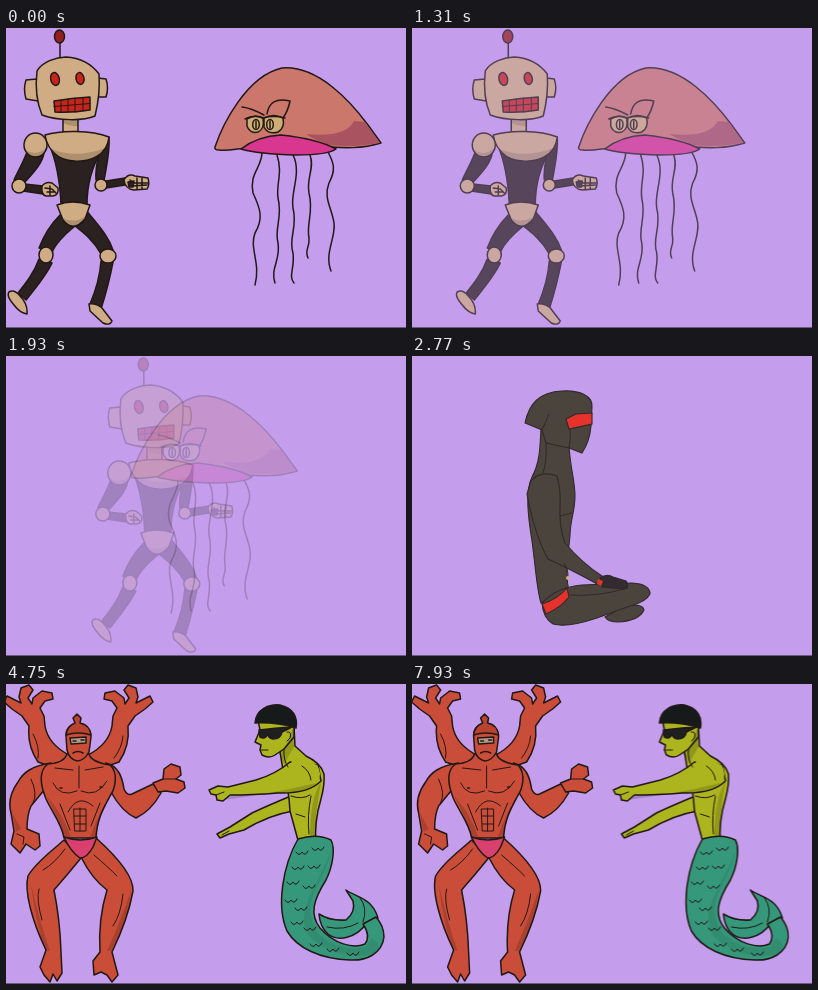
An HTML page that plays this animation: 400x300 px, repeating every 7990 ms.

```html
<!DOCTYPE html>
<html lang="en">
<head>
<meta charset="utf-8">
<title>Fusions</title>
<style>
html, body { margin: 0; width: 100%; height: 100%; overflow: hidden; background: #c49dec; }
svg { display: block; width: 100%; height: 100%; }
.ink { stroke: #221815; stroke-width: 1.5; stroke-linejoin: round; stroke-linecap: round; }
.line { fill: none; }
.thin { stroke-width: 1; }
.shade { stroke: none; fill: #000; opacity: .16; }
.bone { fill: #cfac84; }
.dark { fill: #2a2120; }
.lamp { fill: #c8241c; }
.ninja { fill: #4b443c; stroke: #30282a; stroke-width: 1.1; }
.flesh { fill: #ca4d38; }
.lime { fill: #acb41e; }
.teal { fill: #36987a; }
</style>
</head>
<body>
<svg viewBox="0 0 400 300" preserveAspectRatio="none">
<rect width="400" height="300" fill="#c49dec"/>

<g id="robot" class="ink">
  <path class="line" d="M54 14V30"/>
  <ellipse class="lamp" cx="53.500" cy="8.500" rx="5" ry="6.500" style="fill:#94201d"/>
  <g class="bone">
    <path d="M57 89V104H72V89Z"/>
    <path d="M31 51L20 52Q17 61 20 71L32 73ZM92 50L100 51Q103 60 100 69L91 69Z"/>
    <path d="M31 43C36 34 50 29 60 29C76 30 87 38 93 46C94 60 92 76 89 88C78 93 52 93 36 87C31 75 29 60 31 43Z"/>
  </g>
  <g class="lamp">
    <ellipse cx="49" cy="51" rx="4.300" ry="6.500" transform="rotate(-14 49 51)"/>
    <ellipse cx="74" cy="50.500" rx="4" ry="6" transform="rotate(-12 74 50.500)"/>
    <path d="M48 73Q66 70 84 69V82Q66 85 49 84Z"/>
  </g>
  <path class="line thin" d="M48 78.500L84 75.500M55 72V84M62 71V84M69 70V84M77 70V83"/>
  <g class="dark">
    <path d="M43 116C50 132 54 155 55 176L81 177C81 155 86 138 96 122Z"/>
    <path d="M94 120L103 109C104 125 100 140 98 153L90 152C89 140 92 130 94 120Z"/>
    <path d="M100 153L119 150V157L100 160Z"/>
    <path d="M21 124L38 125C36 136 27 145 19 154L8 152C12 143 17 135 21 124Z"/>
    <path d="M18 156L37 158V166L17 163Z"/>
    <path d="M54 187L69 198C58 207 50 215 46 224L33 220C38 207 46 195 54 187Z"/>
    <path d="M33 231L46 235C40 248 28 262 20 272L12 265C20 255 28 245 33 231Z"/>
    <path d="M80 182C90 195 102 207 107 222L95 226C88 213 78 205 69 198Z"/>
    <path d="M95 233L107 234C104 250 100 265 95 281L84 276C90 262 94 248 95 233Z"/>
  </g>
  <g class="bone">
    <path d="M39 107C55 102 85 102 103 109C102 119 97 125 90 129C79 135 62 134 53 129C46 124 40 116 39 107Z"/>
    <ellipse cx="29.500" cy="117" rx="11.500" ry="12"/>
    <circle cx="13" cy="158" r="7"/>
    <circle cx="95" cy="157" r="6"/>
    <path d="M36 158Q40 153 46 155L52 160Q53 167 47 168H40Q35 167 36 158Z"/>
    <path d="M118 152Q122 145 129 148L142 150Q144 157 141 161L128 162Q119 161 118 152Z"/>
    <path d="M51 177Q66 171 84 177L79 191Q67 205 57 192Z"/>
    <ellipse cx="40" cy="227" rx="7" ry="8"/>
    <ellipse cx="102" cy="228" rx="8" ry="7"/>
    <path d="M3 264Q8 261 14 268Q22 276 21 286Q14 285 8 277Q0 268 3 264Z"/>
    <path d="M83 276Q90 275 96 280L106 293Q104 298 97 295L84 283Z"/>
  </g>
  <path class="line" d="M39 160L46 161L50 165M41 164L48 164M44 158V167M124 152L128 155H142M126 158L141 157M131 150V161M136 150V161"/>
  <path class="dark" d="M122 154L128 153L127 159L123 159Z"/>
  <path class="shade" d="M57 92H72V98Q64 99 57 95ZM45 121Q70 131 99 120Q96 126 90 129Q62 137 53 129ZM57 190Q68 196 80 188L77 195Q67 204 57 192ZM20 122Q30 129 41 119Q39 129 30 129Q22 129 20 122Z"/>
</g>

<g id="jelly" class="ink">
  <path class="line" d="M256 124C256 140 243 145 247 165C254 180 258 190 249 205C243 220 255 235 249 257
    M271 127C277 145 270 155 272 170C277 190 268 200 272 215C275 232 264 240 269 255
    M287 127C296 145 284 165 287 180C292 200 282 210 287 225C289 240 282 248 288 255
    M304 127C309 140 300 150 303 165C308 185 300 195 303 210C304 220 298 222 302 230
    M322 124C328 135 330 142 323 155C317 170 326 180 328 195C330 210 318 225 325 243"/>
  <path fill="#cb776c" d="M209 119C216 98 240 48 276 40C312 37 345 74 362 97L375 115C355 121 338 120 324 119L240 120C230 121 222 123 213 122Q208 122 209 119Z"/>
  <path fill="#a8535f" stroke="none" d="M359 94L374 115Q345 120 324 117Q308 112 300 106Q340 110 348 93Z"/>
  <path fill="#d8368f" d="M235 121Q252 108 275 107Q312 111 330 121Q322 127 290 127Q252 126 235 121Z"/>
  <g fill="#cfae76">
    <path d="M241 91Q249 86 257 90Q259 101 252 104Q244 106 241 98Z"/>
    <path d="M258 90Q268 85 277 90Q279 100 272 104Q262 107 258 99Z"/>
  </g>
  <path class="line" d="M236 79Q245 80 258 87M261 86C263 74 270 70 284 73Q282 83 277 90M239 91Q248 86 257 90Q268 87 279 90"/>
  <g fill="#cfae76"><ellipse cx="250" cy="96.500" rx="3.300" ry="5"/><ellipse cx="264" cy="96.500" rx="3.300" ry="5"/></g>
  <path class="line" d="M250 93V100M264 93V100"/>
</g>

<g id="meditator" class="ninja">
  <path d="M193 261L213 250Q231 247 232 254Q227 265 206 266Q196 266 193 261Z"/>
  <path d="M129 72C128 92 128 106 120 121C113 135 116 160 120 185C124 215 125 235 129 247L158 238C152 220 156 200 158 180C158 165 163 155 163 140C163 125 158 110 157 90Z"/>
  <path d="M113 67C117 48 127 36 150 35C168 34 181 40 180 51L179 70C178 82 174 91 170 97L157 92L134 87L130 74Z"/>
  <path d="M130 247Q145 231 170 229L220 227Q238 228 238 238Q234 246 218 250L185 262Q155 272 141 268Q131 262 130 247Z"/>
  <path d="M119 125Q128 114 145 120Q149 135 148 150Q147 172 153 187Q170 207 190 220L187 229Q160 214 136 203C126 185 119 160 115 138Z"/>
  <path d="M188 222Q195 217 201 221L214 225Q219 231 211 233L190 231Z" style="fill:#342b30"/>
  <path class="line thin" d="M130 74Q134 65 137 58M158 73Q159 84 157 92M134 87Q135 105 131 117M148 160L160 157M152 207Q158 216 155 225M158 239Q185 241 216 232"/>
  <g style="fill:#e5332b">
    <path d="M154 63L164 58L180 57V68L157 73Z"/>
    <path d="M130 248Q146 243 155 232L157 241Q148 252 134 258Z"/>
    <path d="M186 223L191 225L189 230L185 228Z" stroke="none"/>
  </g>
  <circle cx="156" cy="222" r="2" fill="#cfac94" stroke="none"/>
</g>

<g id="brute" class="ink flesh">
  <path id="claw" d="M82 71Q103 60 106 42L107 32L111 24L106 17L98 15L99 9L109 7L118 14L119 20L123 14L118 6L122 1L130 4L132 13L130 19L138 15L144 12L147 18L139 25L129 32L122 42Q124 62 113 78L90 86Z"/>
  <use href="#claw" transform="translate(145) scale(-1 1)"/>
  <path d="M58 156C46 167 30 178 22 192C18 207 26 237 40 266L34 283L38 291L44 298L47 290L51 297L56 289L55 268Q54 236 48 206Q62 190 75 174Z"/>
  <path d="M75 173Q86 195 101 206Q92 235 94 268L87 277L88 291L95 288L101 291L106 298L112 291L106 268Q122 235 127 207Q128 188 90 154Z"/>
  <path d="M45 79C25 82 17 89 12 98C4 109 2 118 5 129L8 147L5 160L14 169L20 160L29 166L34 162L33 150L21 145Q21 131 25 122L39 105Z"/>
  <path d="M100 79C112 82 116 92 118 105Q121 112 126 110L147 100L155 109Q145 127 130 134Q116 128 105 108Z"/>
  <path d="M147 99L157 95L158 85L165 80L174 83L175 91L170 95L178 98L179 104L172 109L160 107L152 108Z"/>
  <path d="M42 80Q58 79 61 70H83Q85 78 104 81C113 89 109 105 104 112C97 125 91 135 90 154H58C56 140 46 128 40 115C34 100 32 87 42 80Z"/>
  <path d="M60 52Q60 41 71 40Q85 42 85 53L83 68Q78 77 71 77Q63 75 61 66Z"/>
  <path d="M60 51Q61 42 69 39L67 34L71 30L75 34L74 39Q84 41 85 51Q72 47 60 51Z" style="fill:#b8432f"/>
  <path d="M58 153Q74 159 91 153L87 163Q81 174 74 174Q64 167 58 153Z" fill="#d9406f"/>
  <path d="M64 54L80 53V59L65 60Z" fill="#b59b87"/>
  <path class="line" d="M67 57H70M75 56H78M67 69Q72 66 77 69"/>
  <path class="line thin" d="M47 99Q54 114 71 107M75 107Q91 114 101 97M62 128Q72 109 87 122M54 120L64 146M94 119L85 142M68 125H80V147H69ZM74 124V147M68 132H80M69 140H80M73 82V104M49 84L67 86M79 86L97 83M25 95Q32 110 27 119M27 50Q34 63 32 74M117 52Q116 64 108 74M59 165Q48 180 37 186M88 171Q102 183 111 192M33 205Q30 215 36 236M117 210Q115 230 107 242M11 150L18 153L17 160M157 95L171 95"/>
  <path class="line" d="M54 104H56M94 103H96"/>
  <path class="shade" d="M40 112Q49 125 58 153H65Q54 125 40 112ZM107 108Q95 123 84 153H90Q93 131 107 108ZM25 200Q29 235 39 266L44 267Q33 235 25 200ZM125 207Q113 240 101 267H105Q122 235 125 207ZM6 128L10 148L15 145Z"/>
</g>

<g id="merman" class="ink">
  <g class="lime">
    <path d="M285 112Q263 121 246 129L224 143L211 150L214 154L223 150L238 146Q263 131 287 127Z"/>
    <path d="M274 68L277 86Q283 105 284 127L293 160H310Q308 138 315 115Q319 100 318 90Q315 79 300 72L289 62L288 42Z"/>
    <path d="M284 78Q270 90 250 96L222 103L212 102L203 106L205 110L210 111L211 116L217 117L224 111Q246 111 272 109Q302 110 315 97L312 81Z"/>
    <path d="M252 36L254 46L249 58L255 61L254 66L256 71Q263 75 269 71L278 65L288 53V37Z"/>
  </g>
  <path class="lime" stroke="none" d="M288 71L311 81Q317 90 311 98L280 104L285 79Z"/>
  <path d="M249 39C250 25 263 20 274 21C287 24 292 33 290 44Q270 38 249 39Z" fill="#171a1a"/>
  <path d="M253 46L272 44L286 43L276 48Q275 55 267 55Q262 54 262 50Q259 56 254 53Z" fill="#1e201f"/>
  <path class="line thin" d="M281 48Q286 47 284 54L281 57M255 66L262 66M278 65Q277 76 282 83M296 82Q304 87 305 96M285 112Q296 116 304 111M290 130L299 133M305 112Q301 132 303 150M210 111L218 108M216 151L223 147"/>
  <path class="shade" d="M315 98Q304 113 304 156H310Q308 136 315 98ZM217 116Q260 111 310 99Q301 109 272 109L224 111ZM287 44L279 64L273 69L278 80L288 63Z"/>
  <path class="teal" d="M340 206C352 214 366 214 372 234L360 240C350 254 332 258 322 250Q314 243 313 230Q324 237 340 236Q350 228 347 217Z"/>
  <path class="teal" d="M292 155Q311 149 325 156C330 165 326 184 320 196C308 215 303 230 314 244C328 260 347 265 359 260Q365 252 357 240L370 233Q378 242 378 253C376 270 360 277 344 276C314 275 291 264 281 247C270 222 277 181 292 155Z"/>
  <path class="shade" d="M326 164Q321 185 310 205Q297 230 314 251Q333 268 360 263L365 254Q374 257 372 266C360 277 324 273 304 253C286 227 313 202 326 164Z" style="opacity:.08"/>
  <g id="scales" class="line thin"></g>
  <path class="line thin" d="M354 214Q362 224 357 238M321 243Q338 247 352 239"/>
</g>

<rect y="299" width="400" height="1" fill="#6d5a80"/>
</svg>
<script>
const LOOP = 7990, TRAVEL = 100, SPEED = .067, RAMP = 360;
const el = id => document.getElementById(id);

el('scales').innerHTML = [[290, 168], [306, 164], [286, 183], [302, 182], [281, 198],
  [297, 202], [279, 216], [289, 224], [285, 238], [298, 244], [304, 260], [321, 265], [341, 269]]
  .map(([x, y]) => `<path d="M${x} ${y}q3 5 6 0q3 5 6 -1"/>`).join('');

// Speeds up evenly during RAMP, then keeps a constant speed.
function distance(t) {
  if (t <= 0) return 0;
  return t < RAMP ? SPEED * t * t / (2 * RAMP) : SPEED * (t - RAMP / 2);
}

// An actor shows from `enter` to `exit`; at `go` it starts to drift and fade.
const scenes = [
  { enter: 0, go: 500, exit: 2170, actors: { robot: 1, jelly: -1 } },
  { enter: 2770, go: 2940, exit: 4630, actors: { meditator: 0 } },
  { enter: 4630, go: 7800, exit: LOOP, actors: { brute: 1, merman: -1 } }
];

function draw(now) {
  const t = now % LOOP;
  for (const { enter, go, exit, actors } of scenes) {
    const moved = distance(t - go);
    const visible = t >= enter && t < exit;
    const alpha = visible ? 1 - Math.min(1, moved / TRAVEL) ** 1.4 : 0;
    for (const [id, direction] of Object.entries(actors)) {
      el(id).setAttribute('opacity', alpha);
      el(id).setAttribute('transform', `translate(${direction * moved})`);
    }
  }
}

const start = performance.now();
function tick() {
  draw(performance.now() - start);
  requestAnimationFrame(tick);
}
tick();
</script>
</body>
</html>
```
